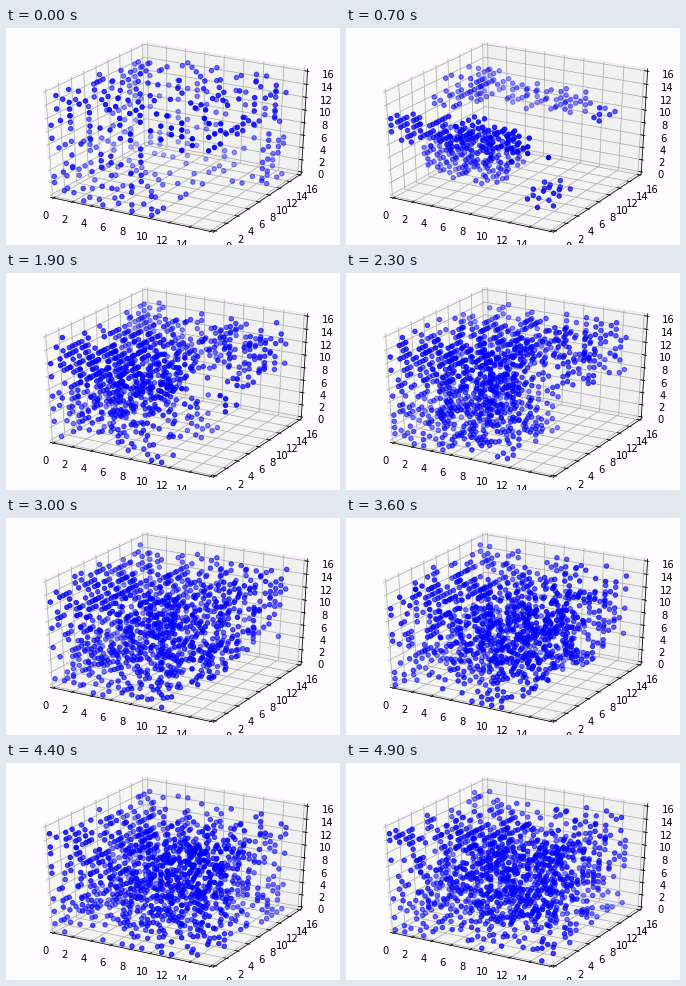
Recreate the animation shown at these times as a matplotlib script. Size 334 by 217 pixels, loop 5 s.

```python
import numpy as np
import matplotlib.pyplot as plt
from matplotlib.animation import FuncAnimation

WIDTH, HEIGHT, DPI = 334, 217, 72
FRAMES, INTERVAL = 50, 100
SIZE = 16
EDGE = 0.5 + 1 / 48          # panes sit slightly outside the data cube
LABEL_EDGE = EDGE + 1 / 12
BACKGROUND = "#fffdff"

# Camera basis for elevation 30, azimuth -60, at distance 10
elev, azim = np.radians(30), np.radians(-60)
RIGHT = np.array([-np.sin(azim), np.cos(azim), 0])
UP = np.array([-np.sin(elev) * np.cos(azim), -np.sin(elev) * np.sin(azim), np.cos(elev)])
TOWARD = np.array([np.cos(elev) * np.cos(azim), np.cos(elev) * np.sin(azim), np.sin(elev)])


def project(points):
    """Cube coordinates (-0.5..0.5) to stage pixels and camera depth."""
    points = np.asarray(points, float)
    depth = 10 - points @ TOWARD
    px = 171.8 + 1808 * (points @ RIGHT) / depth
    py = 105.8 - 1175 * (points @ UP) / depth
    return np.stack([px, py], axis=-1), depth


plt.rcParams["font.family"] = "DejaVu Sans"
fig = plt.figure(figsize=(WIDTH / DPI, HEIGHT / DPI), dpi=DPI, facecolor=BACKGROUND)
ax = fig.add_axes([0, 0, 1, 1])
ax.set_xlim(0, WIDTH)
ax.set_ylim(HEIGHT, 0)
ax.axis("off")


def line(points, color, z):
    xy, _ = project(points)
    ax.plot(xy[:, 0], xy[:, 1], color=color, lw=0.8, zorder=z)


def on_axis(axis, value, others):
    """Point with `value` along `axis`, the rest taken from `others`."""
    point = list(others)
    point[axis] = value
    return point


def draw_pane(axis, side, shade):
    square = np.array([(-1, -1), (1, -1), (1, 1), (-1, 1)]) * EDGE
    xy, _ = project(np.insert(square, axis, side * EDGE, axis=1))
    color = (shade,) * 3 + (0.5,)
    ax.fill(xy[:, 0], xy[:, 1], facecolor=color, edgecolor=color, lw=1, zorder=0)


def draw_axis(axis, signs, tick_dir, grid_path):
    base = np.array(signs) * EDGE
    line([on_axis(axis, -EDGE, base), on_axis(axis, EDGE, base)], "black", 3)
    for tick in range(0, SIZE + 1, 2):
        pos = tick / SIZE - 0.5
        line([on_axis(axis, pos, np.array(p) * EDGE) for p in grid_path], "#b0b0b0", 1)
        mark = np.array([on_axis(axis, pos, base)] * 2)
        mark[:, tick_dir] += signs[tick_dir] * np.array([0.1, -0.2]) / 12
        line(mark, "black", 3)
        (lx, ly), _ = project(on_axis(axis, pos, np.array(signs) * LABEL_EDGE))
        ax.text(lx, ly, str(tick), fontsize=10, ha="center", va="top",
                zorder=4, clip_on=True)


draw_pane(0, -1, 0.95)
draw_pane(1, 1, 0.90)
draw_pane(2, -1, 0.925)
draw_axis(0, (0, -1, -1), 1, [(0, -1, -1), (0, 1, -1), (0, 1, 1)])
draw_axis(1, (1, 0, -1), 0, [(1, 0, -1), (-1, 0, -1), (-1, 0, 1)])
draw_axis(2, (1, 1, 0), 0, [(1, 1, 0), (-1, 1, 0), (-1, -1, 0)])

# Each field gives every cell's chance of being alive
GRID = np.indices((SIZE,) * 3)
X, Y, Z = GRID


def blob(center, radii):
    """Cells inside an ellipsoid that wraps around the cube's faces."""
    shape = (3, 1, 1, 1)
    offset = GRID - np.reshape(center, shape)
    wrapped = (offset + SIZE / 2) % SIZE - SIZE / 2
    return ((wrapped / np.reshape(radii, shape)) ** 2).sum(axis=0) < 1


wall_distance = np.minimum(GRID, SIZE - 1 - GRID).min(axis=0)
shell = 0.33 * ((wall_distance < 1) & ((Z > 10) | (X < 11) | (Y > 10)))
clusters = 0.5 * (blob((6, 0.5, 10.5), (8, 4.5, 2.5)) | blob((4, 7, 4), (5, 4, 4))
                  | blob((1, 11, 12), (2.5, 5, 2.5)) | blob((14, 3, 3), (2, 3, 1.5)))
colony = 0.43 * (blob((4, 4, 9), (5.5, 8, 6.5)) | blob((12, 13, 11.5), (5, 3.5, 3)))
spread = 0.34 * (((X < 12) & (Y < 11)) | ((Z > 7) & (Y > 7)))
full = 0.24 + 0.14 * blob((10, 5, 8), (5, 6, 6))
nearly_full = full * ((X < 13) | (Z > 3))

STAGES = {0: shell, 7: clusters, 15: colony, 23: spread, 36: nearly_full, 44: full}


def live_cells(step):
    start = max(s for s in STAGES if s <= step)
    end = min((s for s in STAGES if s > step), default=FRAMES)
    t = (step - start) / (end - start)
    chance = (1 - t) * STAGES[start] + t * STAGES.get(end, full)
    rng = np.random.default_rng(100 + step)
    return np.argwhere(rng.random(chance.shape) < chance)


dots = ax.scatter([], [], s=20, linewidths=1, zorder=5)


def update(step):
    xy, depth = project(live_cells(step) / SIZE - 0.5)
    nearness = -10 / depth
    far = (nearness - nearness.min()) / np.ptp(nearness)
    colors = np.zeros((len(xy), 4))
    colors[:, 2] = 1
    colors[:, 3] = 1 - 0.7 * far
    dots.set_offsets(xy)
    dots.set_facecolor(colors)
    dots.set_edgecolor(colors)
    return (dots,)


anim = FuncAnimation(fig, update, frames=FRAMES, interval=INTERVAL,
                     repeat=True, repeat_delay=0)
plt.show()
```
